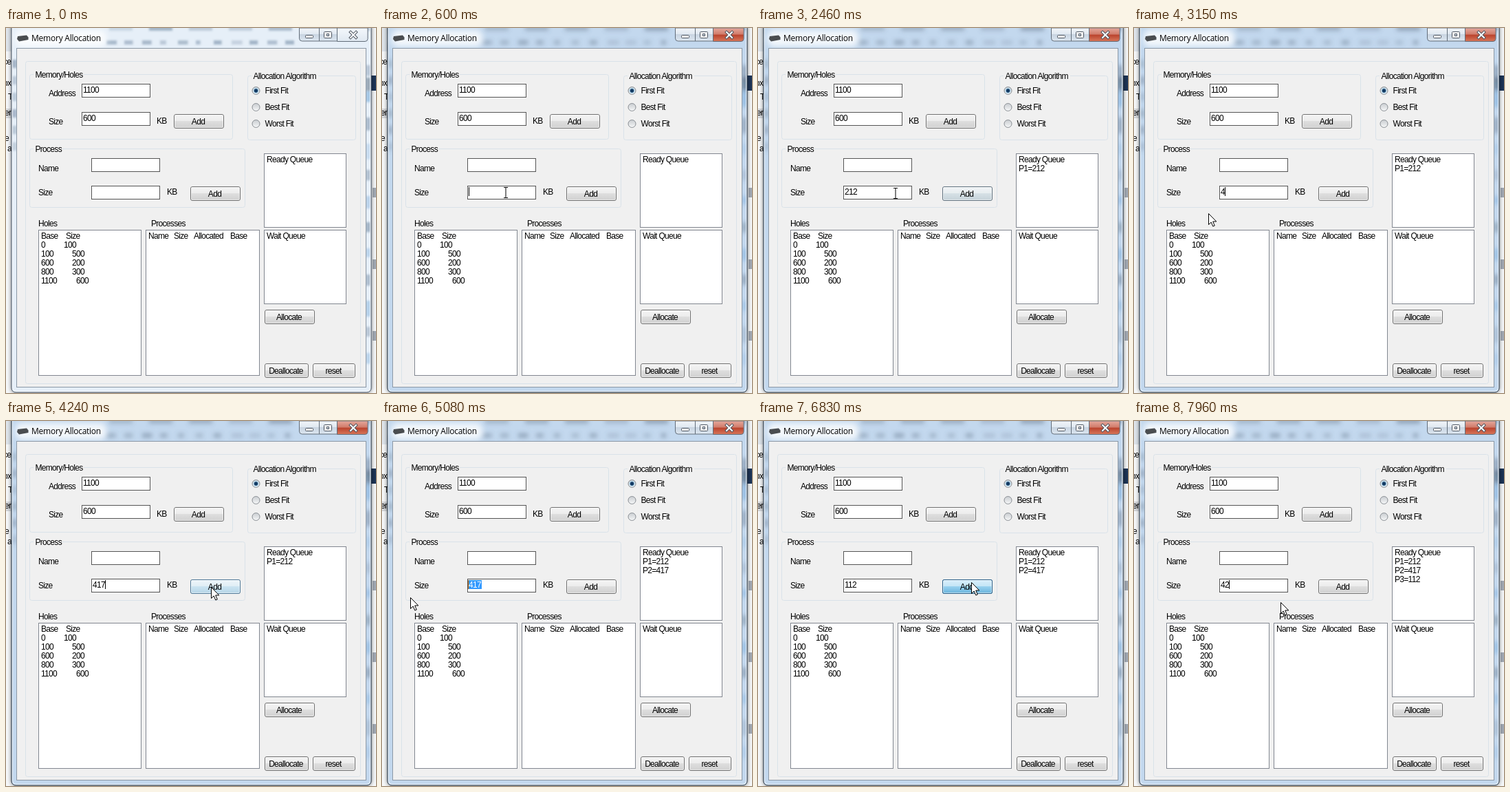
Write an HTML page that moves like this. It is 538 px wide and 530 px high and loops after 8000 ms.

```html
<!DOCTYPE html>
<html lang="en">
<head>
<meta charset="utf-8">
<title>Memory Allocation</title>
<style>
html, body { margin: 0; width: 100%; height: 100%; overflow: hidden; background: #fff; }
svg { display: block; width: 538px; height: 530px; }
text { font: 12px "Liberation Sans", Arial, sans-serif; letter-spacing: -.7px; white-space: pre; }
.title { font: 12px "Open Sans", sans-serif; letter-spacing: -.25px; }
.field { fill: #fff; stroke: #555; }
.list { fill: #fff; stroke: #828790; }
.group { fill: none; stroke: #d9e2e9; }
.mid { text-anchor: middle; }
</style>
</head>
<body>
<svg id="stage" viewBox="0 0 538 530" xmlns="http://www.w3.org/2000/svg"></svg>
<script>
const LOOP = 8000, LINE = 13, DIGIT = 6, FADE = 160, BLINK = 530;
const ADD = { x: 268, y: 230, w: 73, h: 21 };
const ENTRY = { x: 124, y: 229, w: 100, h: 20 };

// ---- timeline: each size is typed, added with a click, then selected ----
const rounds = [
  { size: '212', start: 910, step: 120, click: 2140, select: 2640 },
  { size: '417', start: 3080, step: 380, click: 4300, select: 4850 },
  { size: '112', start: 5300, step: 165, click: 6830, select: 7480 },
  { size: '42', start: 7800, step: 80 }
];
const jobs = rounds.filter(r => r.click);
const keys = [{ at: 560, text: '' }].concat(rounds.flatMap(r =>
  [...r.size].map((_, i) => ({ at: r.start + i * r.step, text: r.size.slice(0, i + 1) }))));

// pointer moves: start, end, x, y
const moves = [
  [150, 480, 180, 239], [1150, 1450, 302, 240], [2280, 2560, 144, 240], [2560, 2740, 39, 258],
  [2860, 3500, 191, 283], [3840, 4240, 298, 241], [4460, 4700, 144, 239], [4700, 4930, 2, 254],
  [4950, 5550, 180, 261], [5630, 6250, 310, 234], [6950, 7100, 230, 237], [7270, 7650, 71, 238],
  [7760, 7960, 213, 263]
];

const clamp = v => Math.max(0, Math.min(1, v));
const inside = (b, p) => p.x >= b.x && p.x < b.x + b.w && p.y >= b.y && p.y < b.y + b.h;

function pointer(t) {
  let p = { x: 250, y: 540 };
  for (const [from, to, x, y] of moves) {
    const k = clamp((t - from) / (to - from));
    p = { x: p.x + (x - p.x) * k, y: p.y + (y - p.y) * k };
  }
  return { x: Math.round(p.x), y: Math.round(p.y) };
}

// share of the last moments spent over the button
function hover(t) {
  const n = 8;
  let hits = 0;
  for (let i = 0; i < n; i++) hits += inside(ADD, pointer(t - i * FADE / n));
  return hits / n;
}

// ---- markup helpers ----
let seed = 7;
const random = (lo, hi) => {
  seed = seed * 16807 % 2147483647;
  return lo + (hi - lo) * seed / 2147483647;
};
const repeat = (n, make) => Array.from({ length: n }, (_, i) => make(i)).join('');
const rect = (x, y, w, h, attr = '') => `<rect x="${x}" y="${y}" width="${w}" height="${h}" ${attr}/>`;
const fill = (x, y, w, h, color, attr = '') => rect(x, y, w, h, `fill="${color}" ${attr}`);
const label = (x, y, s, attr = '') => `<text x="${x}" y="${y}" ${attr}>${s}</text>`;
const box = (cls, x, y, w, h) => rect(x + .5, y + .5, w - 1, h - 1, `class="${cls}" rx="${cls === 'group' ? 3 : 0}"`);
const entry = (x, y, s = '') => box('field', x, y, 100, 20) + label(x + 2, y + 13, s);
const grad = (id, ...colors) => `<linearGradient id="${id}" x2="0" y2="1">${
  colors.map((c, i) => `<stop offset="${i / (colors.length - 1)}" stop-color="${c}"/>`).join('')}</linearGradient>`;
const bevel = (id, a, b, c, d) => `<linearGradient id="${id}" x2="0" y2="1"><stop stop-color="${a}"/>
  <stop offset=".48" stop-color="${b}"/><stop offset=".5" stop-color="${c}"/><stop offset="1" stop-color="${d}"/></linearGradient>`;
const face = ({ x, y, w, h }, paint, line) =>
  rect(x + .5, y + .5, w - 1, h - 1, `rx="2.5" fill="url(#${paint})" stroke="${line}"`) +
  rect(x + 1.5, y + 1.5, w - 3, h - 3, 'rx="1.5" fill="none" stroke="#fff" stroke-opacity=".55"');
const button = (x, y, w, s) =>
  face({ x, y, w, h: 21 }, 'plain', '#707070') + label(x + w / 2 - 1, y + 15, s, 'class="mid"');
const group = (x, y, w, h, s, gap) =>
  box('group', x, y, w, h) + fill(x + 6, y - 3, gap, 8, '#f0f0f0') + label(x + 8.5, y + 5, s);
const radio = (y, s, on) =>
  `<circle cx="363.5" cy="${y}" r="5.5" fill="url(#dot)" stroke="#8a8f94"/>` +
  (on ? `<circle cx="363.5" cy="${y}" r="4.2" fill="#b5d5e8"/><circle cx="363.5" cy="${y}" r="2.7" fill="#123a63"/>` : '') +
  label(376.5, y + 4, s);

// ---- glass frame, idle or active ----
function glass(id, tint, edge, ink, blur, close) {
  const smudge = (x, y, w, h, c) => fill(x, y, w, h, c, `opacity="${random(.2, .5)}"`);
  const marks =
    repeat(7, i => smudge(150 + i * 58, -4, 34, 8, ink)) +
    repeat(11, i => smudge(146 + i * 26, 18, random(6, 18), 6, ink)) +
    repeat(6, i => smudge(8, 46 + i * 24, 8, 12, ink)) +
    repeat(12, i => smudge(523, 54 + i * 38, 8, random(12, 24), i % 2 ? '#5f9bd2' : ink)) +
    smudge(523, 72, 8, 20, '#0c1c34');
  return `<g id="${id}">` +
    fill(8, -8, 523, 537, tint, `rx="6" stroke="${edge}"`) +
    `<clipPath id="${id}Clip">${rect(9, 0, 521, 528)}</clipPath>
     <g clip-path="url(#${id}Clip)"><g filter="url(#${blur})">${marks}</g></g>` +
    fill(14, 3, 132, 24, '#fff', 'rx="9" opacity=".8" filter="url(#glow)"') +
    rect(9.5, -6, 520, 533.5, 'rx="5" fill="none" stroke="#fff" stroke-opacity=".65"') +
    `<path d="M426.5 0V15q0 4 4 4H481.5V0Z" fill="url(#cap)" stroke="#626d79"/>
     <path d="M481.5 0V19.5H522q4 0 4-4V0Z" fill="url(#${close})" stroke="#626d79"/>
     <path d="M455.5 0V19" stroke="#626d79"/></g>`;
}

const soften = (id, size) =>
  `<filter id="${id}" x="-20%" y="-60%" width="140%" height="220%"><feGaussianBlur stdDeviation="${size}"/></filter>`;
const defs = '<defs>' +
  bevel('plain', '#f4f4f4', '#ececec', '#dedede', '#d0d0d0') +
  bevel('hot', '#eaf6fd', '#d9f0fc', '#bee6fd', '#a7d9f5') +
  bevel('down', '#d8eefa', '#c4e5f6', '#98d1ef', '#68b3db') +
  bevel('cap', '#f2f6fa', '#dfe7f0', '#c8d4e1', '#dde7f1') +
  bevel('red', '#e5a89c', '#d07a69', '#b9412c', '#d8775a') +
  grad('pale', '#f4f8fc', '#dfe8f1') + grad('dot', '#c9cdd1', '#f6f7f8') +
  soften('soft', 3) + soften('fine', 1.5) + soften('glow', 4) + '</defs>';

const backdrop =
  fill(0, 0, 538, 530, '#f6f8fa') + fill(0, 0, 8, 34, '#dfe5ec') + fill(0, 117, 8, 14, '#d4d7db') +
  label(-4, 53, 'ce') + label(-4, 84, 'ox') + label(3, 104, 'T') +
  label(-2, 127, 'er') + label(-2, 164, 'e') + label(2, 179, 'a') +
  fill(531, 69, 7, 22, '#1d3557') + repeat(3, i => fill(533, 232 + i * 104, 5, 14, '#a3abb5')) +
  rect(8, -8, 523, 537, 'rx="6" fill="#000" opacity=".6" filter="url(#soft)"');

const cross = (color, width) =>
  `<path d="M501 6 509 14M509 6 501 14" stroke="${color}" stroke-width="${width}" stroke-linecap="square"/>`;
const captions =
  '<path d="M17 12 30 10.5 32.5 13.5V17L19 19.5 16 16Z" fill="#4a4d50"/>' +
  label(37, 19, 'Memory Allocation', 'class="title"') +
  `<g fill="#fff" stroke="#4d5560">${rect(435.5, 10.5, 11, 4, 'rx="1"')}${rect(462.5, 5.5, 11, 9, 'rx="1"')}</g>` +
  rect(466.5, 8.5, 3, 3, 'fill="#d5dfe9" stroke="#4d5560"') + cross('#4d5560', 4) + cross('#fff', 2);

// each hole begins where the one before it ends
function holeRows(sizes) {
  let base = 0;
  return sizes.map((size, i) => {
    const y = 306 + LINE * (i + 1), s = String(base);
    base += size;
    return label(51, y, s) + label(78 + DIGIT * s.length, y, size);
  }).join('');
}

const form =
  fill(15, 29, 509, 493, '#8b98a6') + fill(16, 30, 507, 491, '#f0f0f0') +
  box('group', 28, 48, 488, 469) +
  group(34, 67, 296, 95, 'Memory/Holes', 73) +
  group(351, 69, 158, 94, 'Allocation Algorithm', 97) +
  group(34, 175, 314, 86, 'Process', 42) +
  label(62, 99, 'Address') + entry(110, 81, '1100') +
  label(62, 140, 'Size') + entry(110, 122, '600') + label(219, 139, 'KB') +
  label(47, 208, 'Name') + entry(124, 189) +
  label(47, 243, 'Size') + entry(ENTRY.x, ENTRY.y) + label(234, 242, 'KB') +
  ['First Fit', 'Best Fit', 'Worst Fit'].map((s, i) => radio(91 + 24 * i, s, !i)).join('') +
  label(47, 288, 'Holes') + box('list', 47, 293, 150, 212) +
  label(51, 306, 'Base') + label(87, 306, 'Size') + holeRows([100, 500, 200, 300, 600]) +
  label(211, 288, 'Processes') + box('list', 203, 293, 166, 212) +
  label(207, 306, 'Name') + label(244, 306, 'Size') + label(273, 306, 'Allocated') + label(326, 306, 'Base') +
  box('list', 375, 182, 120, 108) + label(379, 195, 'Ready Queue') +
  box('list', 375, 293, 120, 108) + label(379, 306, 'Wait Queue') +
  button(244, 125, 73, 'Add') + button(376, 409, 73, 'Allocate') +
  button(376, 487, 64, 'Deallocate') + button(446, 487, 62, 'reset') +
  face(ADD, 'plain', '#707070') +
  `<g id="hot">${face(ADD, 'hot', '#3c7fb1')}</g><g id="down">${face(ADD, 'down', '#2c628b')}</g>` +
  label(303.5, 245, 'Add', 'class="mid"');

const live =
  jobs.map((r, i) => label(379, 195 + LINE * (i + 1), `P${i + 1}=${r.size}`, `id="job${i}"`)).join('') +
  `<g id="mark">${fill(126, 231, 19, 13, '#39f')}${fill(125, 231, 1, 13, '#c60')}</g>` +
  label(126, 242, '', 'id="typed"') + fill(0, 231, 1, 13, '#000', 'id="caret"') +
  `<path id="arrow" d="M.5.5V16.5L4.2 13 6.8 19 9.3 18 6.7 12H11.8Z" fill="#fff" stroke="#000"/>
   <path id="beam" d="M-3-7.5H3M0-7.5V7.5M-3 7.5H3" stroke="#000"/>`;

document.getElementById('stage').innerHTML = defs + backdrop +
  glass('idle', '#e6eff8', '#4c5968', '#5d7894', 'fine', 'pale') +
  glass('active', '#c3d8ee', '#2d3845', '#5a6a7e', 'soft', 'red') +
  captions + form + live;

const part = {};
document.querySelectorAll('#stage [id]').forEach(e => part[e.id] = e);
const show = (id, on) => part[id].style.display = on ? '' : 'none';

function draw(t) {
  const key = keys.filter(k => k.at <= t).pop();
  const text = key ? key.text : '';
  const marked = jobs.some((r, i) => t >= r.select && t < rounds[i + 1].start);
  part.typed.textContent = text;
  part.typed.style.fill = marked ? '#fff' : '#000';
  show('mark', marked);
  show('caret', key && t - key.at < BLINK);
  part.caret.setAttribute('x', ENTRY.x + 2 + DIGIT * text.length);

  jobs.forEach((r, i) => show('job' + i, t >= r.click + FADE / 2));
  const press = r => t < r.click ? 0 : clamp(1.5 - (t - r.click) / FADE);
  part.down.style.opacity = Math.max(...jobs.map(press));
  part.hot.style.opacity = hover(t);

  show('idle', t < 70);
  show('active', t >= 70);
  const p = pointer(t), editing = inside(ENTRY, p);
  show('arrow', !editing);
  show('beam', editing);
  for (const id of ['arrow', 'beam']) part[id].setAttribute('transform', `translate(${p.x} ${p.y})`);
}

const start = performance.now();
function tick() {
  draw((performance.now() - start) % LOOP);
  requestAnimationFrame(tick);
}
tick();
</script>
</body>
</html>
```
